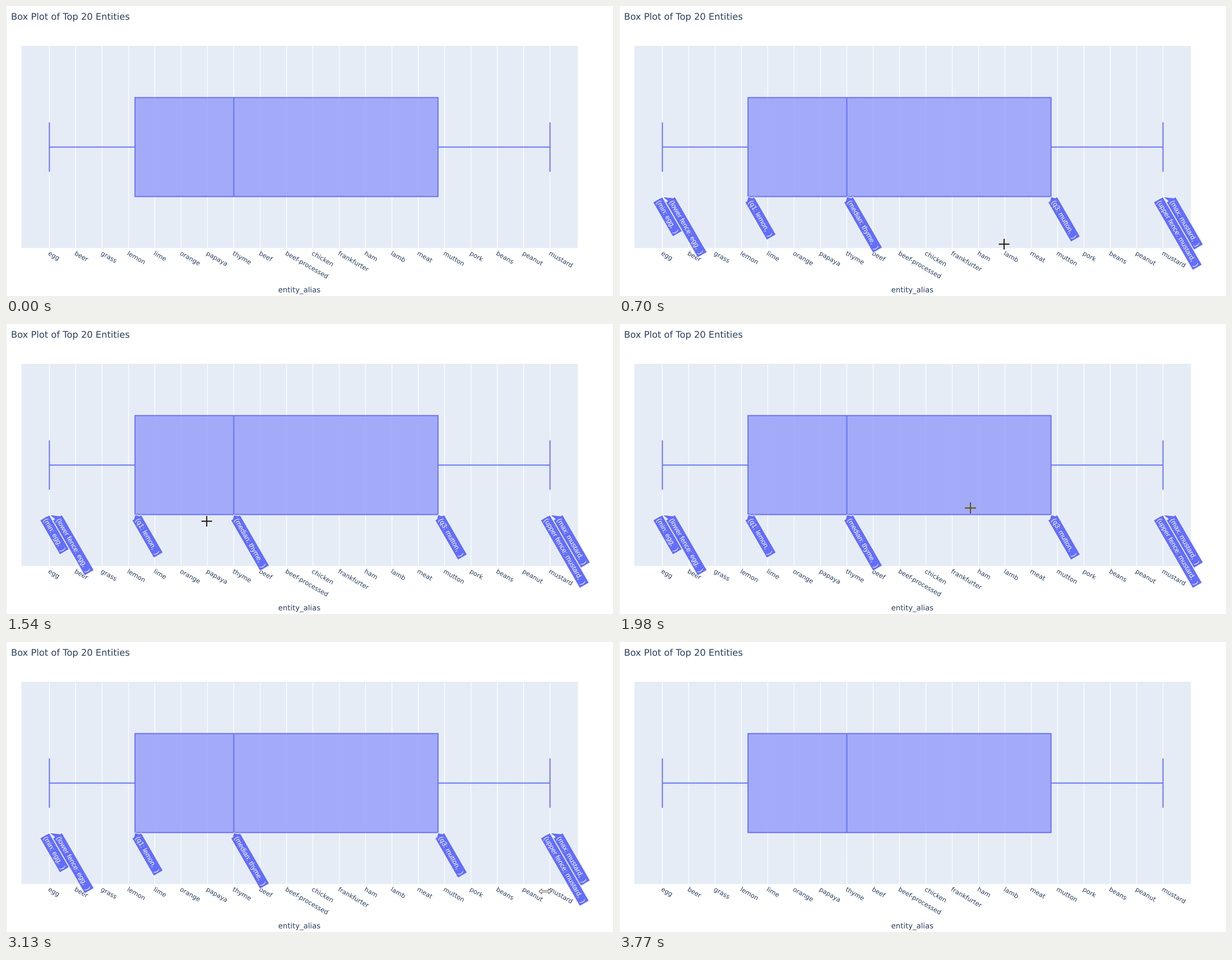
A matplotlib script that plays this animation: 1083x517 px, repeating every 4.09 s.

```python
import numpy as np
import matplotlib.pyplot as plt
from matplotlib.animation import FuncAnimation
from matplotlib.patches import PathPatch, Polygon, Rectangle
from matplotlib.path import Path
from matplotlib.textpath import TextPath
from matplotlib.transforms import Affine2D

W, H, LOOP, STEP = 1083, 517, 4090, 10
PT = 0.72  # points per pixel at 100 dpi
ZOOM = 0.944  # chart units to pixels
BLUE, FILL, PLOT, INK = "#636efa", "#a3abf9", "#e5ecf6", "#2a3f5f"
SANS, ARIAL = "DejaVu Sans", "Liberation Sans"
FOODS = ("egg beer grass lemon lime orange papaya thyme beef beef-processed "
         "chicken frankfurter ham lamb meat mutton pork beans peanut mustard").split()

fig = plt.figure(figsize=(W / 100, H / 100), dpi=100, facecolor="white")
ax = fig.add_axes([0, 0, 1, 1])
ax.set(xlim=(0, W), ylim=(H, 0))
ax.axis("off")


def tick(i):
    return 77.4 + 47.01 * i


def rect(x0, y0, x1, y1, **style):
    return ax.add_patch(Rectangle((x0, y0), x1 - x0, y1 - y0, snap=False, **style))


def line(xs, ys, color=BLUE, width=2 * ZOOM, **style):
    ax.plot(xs, ys, color=color, lw=width * PT, solid_capstyle="butt",
            snap=False, **style)


def outline(text, size, family, x, y, angle=0, dx=0, dy=0):
    """Glyph path of a text turned clockwise about (x, y)."""
    path = TextPath((0, 0), text, size=size, prop={"family": family})
    turn = Affine2D().scale(1, -1).translate(dx, dy).rotate_deg(angle)
    return path.transformed(turn.translate(x, y))


def ink(path, color=INK, order=3):
    return ax.add_patch(PathPatch(path, fc=color, lw=0, zorder=order))


# Chart
TOP, BOTTOM, FLOOR = 71, 431.4, 339.7
MID = (TOP + BOTTOM) / 2 + 0.3
reach = FLOOR - MID
rect(0, 0, 1, H, fc="#e8e8e8", lw=0, zorder=0)
rect(27.5, TOP, 1020.3, BOTTOM, fc=PLOT, lw=0, zorder=0)
ticks = [tick(i) for i in range(len(FOODS))]
for x in ticks:
    line([x, x], [TOP, BOTTOM], "white", 1.25, zorder=1)

LOW, Q1, MEDIAN, Q3, HIGH = (tick(i) for i in (0, 3.25, 7, 14.75, 19))
box = rect(Q1, MID - reach, Q3, FLOOR, fc=FILL, ec=BLUE, lw=2 * ZOOM * PT, zorder=2)
for x in ticks:
    if Q1 < x < Q3:
        line([x, x], [MID - reach + 1, FLOOR - 1], "#a9aff6", 1, zorder=2.5)
line([MEDIAN, MEDIAN], [MID - reach, FLOOR], zorder=3)
for end, edge in ((LOW, Q1), (HIGH, Q3)):
    line([end, edge], [MID, MID], zorder=3)
    line([end, end], [MID - reach / 2, MID + reach / 2], zorder=3)

names = [outline(s, 12 * ZOOM, SANS, x - 3, 443.2, 30) for s, x in zip(FOODS, ticks)]
ink(Path.make_compound_path(*names))
ink(outline("Box Plot of Top 20 Entities", 16.3, SANS, 9, 24.5))
ink(outline("entity_alias", 14 * ZOOM, SANS, 485.7, 510.5))


# Hover labels
def hover(text, x, shift, order):
    y, size = 340.1, 13 * ZOOM
    head, pad, half = 6 * ZOOM, 3 * ZOOM, 9.6
    left = head - shift / np.tan(np.pi / 3)
    words = TextPath((0, 0), text, size=size, prop={"family": ARIAL})
    right = left + words.get_extents().x1 + 2 * pad + 0.6
    shape = [(0, 0), (left, shift + head), (left, shift + half),
             (right, shift + half), (right, shift - half),
             (left, shift - half), (left, shift - head)]
    turn = Affine2D().rotate_deg(60).translate(x, y)
    body = Polygon(turn.transform(shape), fc=BLUE, ec="white", lw=ZOOM * PT,
                   joinstyle="miter", zorder=order)
    glyphs = outline(text, size, ARIAL, x, y, 60, left + pad, shift + size * 0.34)
    return [ax.add_patch(body), ink(glyphs, "white", order + 0.1)]


SIDE = 9.9  # sideways shift of labels that share an anchor
SPECS = [("min: egg", LOW, SIDE), ("lower fence: egg", LOW, -SIDE),
         ("q1: lemon", Q1, 0), ("median: thyme", MEDIAN, 0),
         ("q3: mutton", Q3, 0), ("max: mustard", HIGH, -SIDE),
         ("upper fence: mustard", HIGH, SIDE)]
labels = []
for n, (text, x, shift) in enumerate(SPECS):
    labels += hover(f"({text},  )", x, shift, 4 + n)


# Pointer shapes, relative to the hot spot
def mirrored(*points):
    return np.vstack([points, -np.array(points)])


r, h = 9.5, 1
CROSS = mirrored((-r, -h), (-h, -h), (-h, -r), (h, -r), (h, -h), (r, -h))
RESIZE = mirrored((-11, 0), (-6, -4.5), (-6, -1.4), (6, -1.4), (6, -4.5))
ARROW = np.array([(0, 0), (0, 15.6), (3.6, 12.4), (6, 17.8), (8.3, 16.8),
                  (6, 11.5), (10.8, 11.3)])


def pointer(shape, fc, ec="none"):
    return ax.add_patch(Polygon(shape, fc=fc, ec=ec, lw=0.9 * PT, zorder=20, snap=False))


cross = pointer(CROSS, "#1a1309")
cross_on_box = pointer(CROSS, "#5c5405")  # the cross inverts what lies below it
cross_on_box.set_clip_path(box)
resize = pointer(RESIZE, "white", "#444444")
arrow = pointer(ARROW, "white", "#111111")
pointers = [(cross, CROSS), (cross_on_box, CROSS), (resize, RESIZE), (arrow, ARROW)]

# Pointer moves: start, end, steps, goal and, for curved ones, a control point
ENTRY = (945, 522)
MOVES = [(270, 730, 17, (677, 421.5), (880, 482)),
         (1000, 1270, 11, (405, 354.5)),
         (1540, 1660, 5, (219, 343)),
         (1690, 1980, 9, (627, 328), (420, 312)),
         (2270, 2490, 9, (744.5, 337.5)),
         (2750, 2800, 3, (936.5, 431.5)),
         (3130, 3130, 1, (962, 444.5)),
         (3170, 3620, 20, (1043, 515.5)),
         (3720, 3770, 3, (1045, 520))]
HOVER = (590, 3170)


def place(t):
    """Pointer position: eased curves taken in even steps, with rests between."""
    pos = np.array(ENTRY, float)
    for start, end, steps, goal, *bend in MOVES:
        if t < start:
            break
        goal = np.array(goal)
        mid = np.array(bend[0]) if bend else (pos + goal) / 2
        gap = max(end - start, 1) / max(steps - 1, 1)
        s = min(1, (np.floor((t - start) / gap + 0.2) + 1) / steps)
        u = 1 - (1 - s) ** 1.3
        pos = (1 - u) ** 2 * pos + 2 * u * (1 - u) * mid + u ** 2 * goal
    return pos


def update(n):
    t = n * STEP
    for part in labels:
        part.set_visible(HOVER[0] <= t < HOVER[1])
    pos = place(t)
    if pos[1] < 432.5:
        shown = (cross, cross_on_box)
    else:
        shown = (resize,) if pos[1] < 456 else (arrow,)
    for patch, shape in pointers:
        patch.set_visible(patch in shown)
        patch.set_xy(shape + pos)
    return []


anim = FuncAnimation(fig, update, frames=LOOP // STEP, interval=STEP,
                     repeat=True, repeat_delay=0, blit=False)
plt.show()
```
